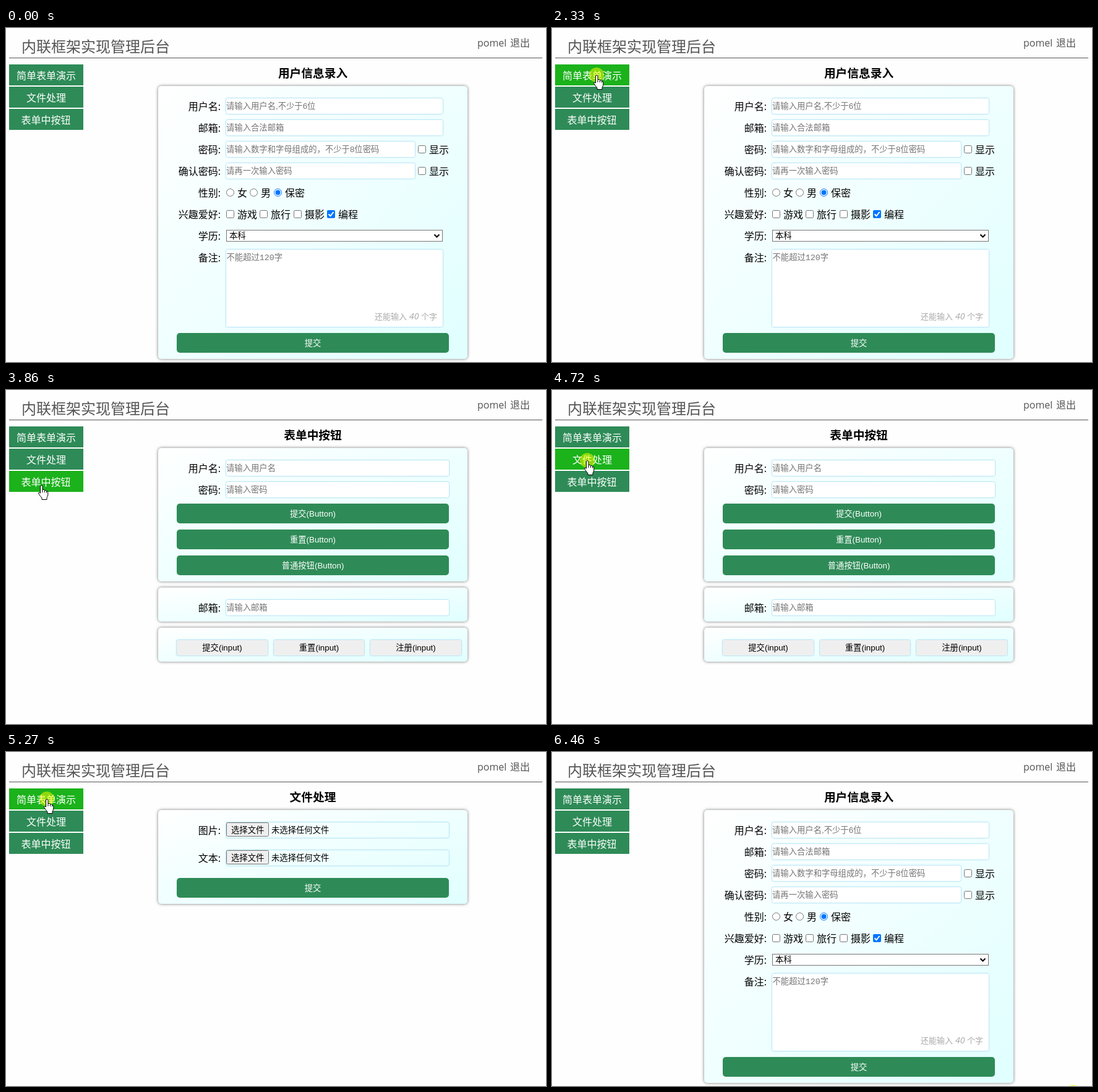
Write an HTML page that moves like this. It is 873 px wide and 541 px high and loops after 6610 ms.

```html
<!DOCTYPE html>
<html lang="zh-CN">
<head>
<meta charset="utf-8">
<title>内联框架实现管理后台</title>
<style>
html, body { margin: 0; width: 100%; height: 100%; overflow: hidden; background: #fefefe; }
svg { display: block; }
text { font: 16px "Open Sans", "Noto Sans CJK SC", "Noto Sans CJK", sans-serif; white-space: pre; }
.title { font-size: 24px; font-weight: 300; }
.grey { fill: #555; }
.nav { fill: #fff; text-anchor: middle; }
.head { font-size: 18.72px; font-weight: bold; text-anchor: middle; }
.label { text-anchor: end; }
.hint, .small, .btn { font: 13.333px "Liberation Sans", "Noto Sans CJK SC", "Noto Sans CJK", sans-serif; }
.hint { fill: #757575; }
.btn { text-anchor: middle; }
.white { fill: #fff; }
.mono { font-family: "Liberation Mono", "Noto Sans CJK SC", "Noto Sans CJK", monospace; }
.count { font-size: 13px; fill: #aaa; }
.count.num { font-size: 14px; font-style: italic; }

.panel { fill: url(#sky); filter: drop-shadow(0 0 2.5px #777); }
.field { fill: #fff; stroke: #bde8f6; filter: drop-shadow(0 0 1px #d5f1fa); }
.clear { fill: none; }
.soft { fill: #efefef; }
.box { fill: #fff; stroke: #767676; }
.green { fill: #2e8b57; }
.hot { fill: #1bb21b; }

.page, .hot, .cur, .cur > * { animation: 6610ms step-end infinite; }
.form { animation-name: form; }
.files { animation-name: files; }
.buttons { animation-name: buttons; }
.hot { animation-name: hover; }
.cur { animation-name: move; }
.cur .ring { animation-name: ring; }
.cur .beam { animation-name: beam; }
.cur .arrow { animation-name: arrow; }
.cur .hand { animation-name: hand; }

@keyframes form { 0%, 81.08%, 100% { opacity: 1 } 47.04% { opacity: 0 } }
@keyframes files { 0%, 57.33%, 81.08%, 100% { opacity: 0 } 47.04%, 72.61% { opacity: 1 } }
@keyframes buttons { 0%, 72.61%, 100% { opacity: 0 } 57.33% { opacity: 1 } }

@keyframes hover {
  0%, 83.35%, 100% { transform: translateY(0); opacity: 0 }
  16.18%, 41.11%, 66.64% { transform: translateY(36px); opacity: 1 }
  18.75%, 76.24% { transform: translateY(0); opacity: 1 }
  51.51% { transform: translateY(72px); opacity: 1 }
}
@keyframes move {
  0% { transform: translate(659px, 426px) }
  6.8% { transform: translate(659px, 426px); animation-timing-function: steps(2) }
  9.15% { transform: translate(441px, 300px); animation-timing-function: steps(2) }
  11.49% { transform: translate(241px, 180px); animation-timing-function: steps(2) }
  13.84% { transform: translate(145px, 122px); animation-timing-function: steps(2) }
  16.18% { transform: translate(117px, 102px) }
  17.54% { transform: translate(108px, 97px); animation-timing-function: steps(3) }
  21.17% { transform: translate(84px, 73px) }
  26.02% { transform: translate(78px, 81px) }
  26.92% { transform: translate(72px, 89px) }
  31.76% { transform: translate(72px, 86px); animation-timing-function: steps(2) }
  34.19% { transform: translate(72px, 76px) }
  37.66% { transform: translate(71px, 79px); animation-timing-function: steps(5) }
  43.41% { transform: translate(66px, 104px) }
  49.16% { transform: translate(65px, 110px); animation-timing-function: steps(4) }
  53.85% { transform: translate(57px, 154px) }
  63.23% { transform: translate(57px, 150px); animation-timing-function: steps(4) }
  67.77% { transform: translate(57px, 118px) }
  70.34% { transform: translate(57px, 114px) }
  75.03% { transform: translate(60px, 102px); animation-timing-function: steps(2) }
  77.45% { transform: translate(66px, 76px) }
  82.14% { transform: translate(83px, 85px); animation-timing-function: steps(2) }
  84.56% { transform: translate(301px, 211px); animation-timing-function: steps(2) }
  86.98% { transform: translate(601px, 395px); animation-timing-function: steps(2) }
  89.4% { transform: translate(805px, 521px) }
  90.61% { transform: translate(809px, 526px) }
  91.75% { transform: translate(814px, 534px) }
  97.73%, 100% { transform: translate(842px, 551px) }
}
@keyframes ring {
  0%, 37.66%, 48.1%, 58.39%, 73.82%, 82.14% { opacity: 0 }
  35.24%, 45.99%, 56.27%, 71.4%, 79.72%, 97.73%, 100% { opacity: 1 }
}
@keyframes beam { 0%, 9.15%, 89.4%, 100% { opacity: 0 } 6.8%, 86.98% { opacity: 1 } }
@keyframes arrow { 0%, 16.18%, 86.98%, 92.88%, 100% { opacity: 0 } 9.15%, 83.35%, 89.4% { opacity: 1 } }
@keyframes hand { 0%, 83.35%, 100% { opacity: 0 } 16.18% { opacity: 1 } }
</style>
</head>
<body>
<svg width="873" height="541" viewBox="0 0 873 541">
  <defs>
    <linearGradient id="sky" x1="0" y1="0" x2="1" y2="1">
      <stop stop-color="#fff"/><stop offset="1" stop-color="#e0ffff"/>
    </linearGradient>
    <rect id="check" class="box" x=".5" y=".5" width="12" height="12" rx="2"/>
    <circle id="radio" class="box" r="6"/>
    <rect id="bar" class="green" x="276" width="440" height="32" rx="5"/>
    <g id="picker">
      <rect class="field clear" x="355.5" y="113.5" width="361" height="26" rx="3"/>
      <rect class="box" style="fill:#efefef" x="356.5" y="114.5" width="68" height="22" rx="2"/>
      <text class="small" x="364" y="131">选择文件</text>
      <text class="small" x="429" y="131">未选择任何文件</text>
    </g>
  </defs>

  <text class="title grey" x="25" y="39">内联框架实现管理后台</text>
  <text class="grey" x="762" y="30">pomel</text>
  <text class="grey" x="815" y="30">退出</text>
  <rect class="grey" x="5" y="48" width="862" height="1"/>

  <rect class="green" x="5" y="59" width="120" height="34"/>
  <rect class="green" x="5" y="95" width="120" height="34"/>
  <rect class="green" x="5" y="131" width="120" height="34"/>
  <rect class="hot" x="5" y="59" width="120" height="34"/>
  <text class="nav" x="65" y="83">简单表单演示</text>
  <text class="nav" x="65" y="119">文件处理</text>
  <text class="nav" x="64.5" y="155">表单中按钮</text>

  <g class="page form">
    <text class="head" x="496" y="79.5">用户信息录入</text>
    <rect class="panel" x="246" y="94" width="500" height="442" rx="5"/>
    <text class="label" x="347" y="133">用户名:</text>
    <text class="label" x="347" y="168">邮箱:</text>
    <text class="label" x="347" y="203">密码:</text>
    <text class="label" x="347" y="238">确认密码:</text>
    <text class="label" x="347" y="273">性别:</text>
    <text class="label" x="347" y="308">兴趣爱好:</text>
    <text class="label" x="347" y="343">学历:</text>
    <text class="label" x="347" y="378">备注:</text>

    <rect class="field" x="355.5" y="113.5" width="351" height="26" rx="3"/>
    <rect class="field" x="355.5" y="148.5" width="351" height="26" rx="3"/>
    <rect class="field" x="355.5" y="183.5" width="306" height="26" rx="3"/>
    <rect class="field" x="355.5" y="218.5" width="306" height="26" rx="3"/>
    <text class="hint" x="356" y="131">请输入用户名,不少于6位</text>
    <text class="hint" x="356" y="166">请输入合法邮箱</text>
    <text class="hint" x="356" y="201">请输入数字和字母组成的，不少于8位密码</text>
    <text class="hint" x="356" y="236">请再一次输入密码</text>
    <use href="#check" x="666" y="190"/><text x="684" y="203">显示</text>
    <use href="#check" x="666" y="225"/><text x="684" y="238">显示</text>

    <use href="#radio" x="362.5" y="266.5"/><text x="374" y="273">女</text>
    <use href="#radio" x="400.5" y="266.5"/><text x="412" y="273">男</text>
    <circle cx="439.5" cy="266.5" r="6" fill="#fff" stroke="#0075ff"/>
    <circle cx="439.5" cy="266.5" r="4" fill="#0075ff"/>
    <text x="451" y="273">保密</text>

    <use href="#check" x="356" y="295"/><text x="374" y="308">游戏</text>
    <use href="#check" x="410" y="295"/><text x="428" y="308">旅行</text>
    <use href="#check" x="465" y="295"/><text x="483" y="308">摄影</text>
    <rect x="519" y="295" width="13" height="13" rx="2" fill="#0075ff"/>
    <path d="M521.5 301.5l3 3l5-6.5" fill="none" stroke="#fff" stroke-width="2"/>
    <text x="537" y="308">编程</text>

    <rect class="box" x="356.5" y="327.5" width="349" height="18"/>
    <text class="small" x="361" y="341">本科</text>
    <path d="M692.5 334.5l4 4l4-4" fill="none" stroke="#000" stroke-width="2"/>

    <rect class="field" x="355.5" y="358.5" width="351" height="126" rx="3"/>
    <text class="hint mono" x="356.5" y="376">不能超过120字</text>
    <text class="count" x="596" y="472">还能输入</text>
    <text class="count num" x="652" y="472">40</text>
    <text class="count" x="671" y="472">个字</text>
    <use href="#bar" y="494"/>
    <text class="btn white" x="496" y="515">提交</text>
  </g>

  <g class="page files">
    <text class="head" x="496" y="79.5">文件处理</text>
    <rect class="panel" x="246" y="94" width="500" height="152" rx="5"/>
    <text class="label" x="347" y="133">图片:</text>
    <text class="label" x="347" y="178">文本:</text>
    <use href="#picker"/>
    <use href="#picker" y="45"/>
    <use href="#bar" y="204"/>
    <text class="btn white" x="496" y="225">提交</text>
  </g>

  <g class="page buttons">
    <text class="head" x="496" y="79.5">表单中按钮</text>
    <rect class="panel" x="246" y="94" width="500" height="216" rx="5"/>
    <rect class="panel" x="246" y="320" width="500" height="55" rx="5"/>
    <rect class="panel" x="246" y="385" width="500" height="55" rx="5"/>
    <text class="label" x="347" y="133">用户名:</text>
    <text class="label" x="347" y="168">密码:</text>
    <text class="label" x="347" y="359">邮箱:</text>
    <rect class="field" x="355.5" y="113.5" width="361" height="26" rx="3"/>
    <rect class="field" x="355.5" y="148.5" width="361" height="26" rx="3"/>
    <rect class="field" x="355.5" y="339.5" width="361" height="26" rx="3"/>
    <text class="hint" x="356" y="131">请输入用户名</text>
    <text class="hint" x="356" y="166">请输入密码</text>
    <text class="hint" x="356" y="357">请输入邮箱</text>
    <use href="#bar" y="184"/><text class="btn white" x="496" y="205">提交(Button)</text>
    <use href="#bar" y="226"/><text class="btn white" x="496" y="247">重置(Button)</text>
    <use href="#bar" y="268"/><text class="btn white" x="496" y="289">普通按钮(Button)</text>
    <rect class="field soft" x="275.5" y="404.5" width="148" height="26" rx="3"/>
    <rect class="field soft" x="432.5" y="404.5" width="147" height="26" rx="3"/>
    <rect class="field soft" x="588.5" y="404.5" width="148" height="26" rx="3"/>
    <text class="btn" x="349.5" y="422">提交(input)</text>
    <text class="btn" x="506" y="422">重置(input)</text>
    <text class="btn" x="662.5" y="422">注册(input)</text>
  </g>

  <g class="cur">
    <circle class="ring" r="12" fill="#ff0" fill-opacity=".5"/>
    <path class="beam" d="M-3 -7.5H4M.5 -7.5V7.5M-3 7.5H4" fill="none" stroke="#000"/>
    <path class="arrow" d="M.5 .8V16.5L4.2 13L6.7 18.5L9 17.5L6.5 12.2H11.3Z" fill="#fff" stroke="#000"/>
    <g class="hand" stroke="#000" stroke-linejoin="round">
      <path d="M-1.5 2Q-1.5 .5 .2 .5Q2 .5 2 2V7.5Q5 6.5 5.5 8.5Q8 7.8 8.5 9.8Q10.8 9.5 10.8 12V16Q10 19 9 20.5V23.5H1V21Q-2 17.5 -4.5 13.5Q-5 10.8 -1.5 13Z" fill="#fff"/>
      <path d="M2 7.5V12M5.5 8.5V12M8.5 9.8V12.5" fill="none"/>
    </g>
  </g>
</svg>
</body>
</html>
```
